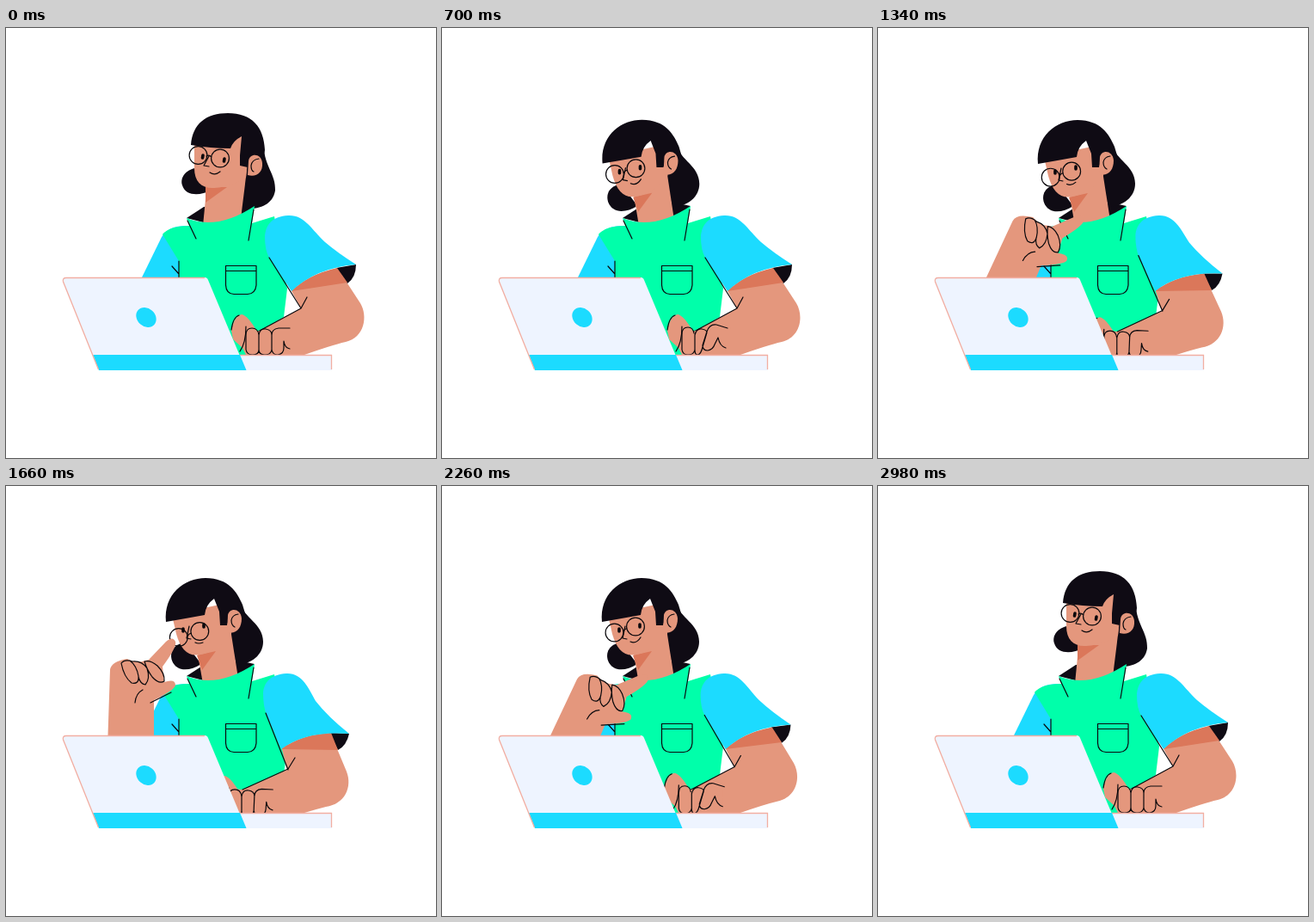
An HTML page for the animation above (3 s loop, 500x500 px).

```html
<!DOCTYPE html>
<html lang="en">
<head>
<meta charset="utf-8">
<title>Typing at a laptop</title>
<style>
  html, body { margin: 0; width: 100%; height: 100%; overflow: hidden; background: #fff; }
  svg { display: block; width: 100%; height: 100%; }
  .skin { fill: #e4977d; }
  .shade { fill: #db775a; }
  .hair { fill: #0f0b14; }
  .blue { fill: #1cdbff; }
  .green { fill: #00ffaa; }
  .pale { fill: #eef4ff; }
  .line { fill: none; stroke: #0a080c; stroke-width: 1.2; stroke-linecap: round; stroke-linejoin: round; }
  .edge { fill: none; stroke: #f2aea2; stroke-width: 1.3; }
  #eyes { stroke-width: 3.6; }
</style>
</head>
<body>
<svg viewBox="0 0 500 500">
  <clipPath id="aboveBase"><path d="M0 0 H500 V385 H0Z"/></clipPath>

  <path class="hair" d="M210 221 L230 208 L275 204 L289 207 L272 224 L245 230Z"/>
  <path class="hair" id="bun"/>
  <path class="hair" id="backHair"/>
  <path class="skin" id="neck"/>
  <path class="shade" id="neckShade"/>
  <path class="skin" id="face"/>
  <path class="hair" id="fringe"/>
  <path class="skin" id="ear"/>
  <path class="line" id="earLine"/>
  <path class="line" id="eyes"/>
  <path class="line" id="nose"/>
  <path class="line" id="mouth"/>
  <path class="line" id="glasses"/>

  <path class="blue" d="M157 292 L181 243 Q189 229 213 230 L202 292Z"/>
  <path class="green" d="M210 221 Q245 236 289 207 L286 227 L312 219 L327 303 L323 336 L290 356 L280 380 H201 V271 L182 240 Q190 230 213 230Z"/>
  <path class="line" d="M211 224 L221 245 M288 211 L282 247 M201 271 V290 M193 277 L201 286 M255.500 276.500 H291 V299 Q290 309 281 309.500 H265 Q256 309 255.500 299Z M255.500 282.500 H291"/>

  <path class="skin" id="arm"/>
  <path class="hair" id="cuff"/>
  <path class="shade" id="armShade"/>
  <path class="blue" id="sleeve"/>
  <path class="line" id="armLines"/>
  <g id="typing">
    <path class="skin" d="M262 352 Q265 335 274 333 Q281 334 292 353 L318 345 L330 350 V380 H279 L275 372 L264 362Z"/>
    <path class="line" d="M262 351 Q264 336 271 334 M279 347 Q279 366 272 376"/>
    <path class="line" id="fingers"/>
  </g>

  <g clip-path="url(#aboveBase)">
    <g id="raised">
      <path class="skin" d="M118 305 L121 214 Q122 204 141 201 Q151 207 162 203 L166 202 L186 181 Q194 174 197 181 Q199 187 182 210 L184 228 L188 227 Q197 225 197 232 Q195 238 172 249 V305Z"/>
      <path class="line" d="M134 206 Q138 201 147 204 M134 206 Q137 222 146 229 Q155 231 154 221 Q152 209 144 203 M147 204 Q158 203 164 212 Q168 224 162 231 Q156 230 154 222 M161 204 Q168 202 176 209 Q185 218 184 227 Q178 231 170 222 Q164 214 161 204 M150 252 Q151 241 159 237 M168 252 L192 240"/>
    </g>
  </g>

  <path class="pale" d="M270 380 H379 V398 H270Z"/>
  <path class="edge" d="M272 380.500 H378.500 V397"/>
  <path class="pale" d="M70 290 H231 Q234 290 235 293 L279 398 H108 L66 295 Q65 290 70 290Z"/>
  <path class="blue" d="M101 380 H272 L279.500 398 H108Z"/>
  <path class="edge" d="M107.500 397 L66.500 295 Q65.500 290.500 70 290.500 H231"/>
  <ellipse class="blue" cx="163" cy="336.500" rx="12.600" ry="10.400" transform="rotate(42 163 336.5)"/>
</svg>
<script>
const LOOP = 3000;
const $ = id => document.getElementById(id);
const R = 10.4;
const ring = (x, y) => `M${x - R} ${y} A${R} ${R} 0 1 1 ${x + R} ${y} A${R} ${R} 0 1 1 ${x - R} ${y}`;

// Each shape has two poses with the same command sequence.
const headPoses = {
  bun: ['M226 162 C209 163 202 174 205 183 C209 196 226 195 238 189Z',
        'M208 182 C194 184 190 194 193 203 C198 216 213 216 227 207Z'],
  backHair: ['M270 130 L300 138 C300 160 314 170 313 189 C310 207 292 212 272 210Z',
             'M245 135 L273 137 C276 153 299 160 299 181 C299 196 286 207 268 208Z'],
  neck: ['M234 178 L229 230 H272 L280 165Z', 'M222 190 L229 230 H271 L260 160Z'],
  neckShade: ['M232 185 L257 185 L232 203Z', 'M222 197 L244 192 L228 214Z'],
  face: ['M219 132 L219 163 C219 179 228 187 242 186 C258 185 270 180 279 174 L284 125Z',
         'M193 150 L198 172 C203 190 212 199 226 196 C240 193 252 186 262 172 L262 135Z'],
  fringe: ['M215 136 C217 111 233 99 258 99 C286 99 300 115 301 142 L299 152 L284 151 L281 162 L272 160 L272 148 L274 126 Q264 131 261 140 Q238 140 215 136Z',
           'M186 158 C183 126 207 107 232 107 C259 107 269 124 275 138 L278 148 L261 147 L257 162 L249 162 L248 146 L242 131 Q232 138 231 150 Q209 154 186 158Z'],
  ear: ['M282 155 C283 145 297 145 298 157 C299 168 291 174 281 171Z',
        'M258 150 C260 141 273 142 274 154 C274 165 268 173 257 170Z'],
  earLine: ['M294 152 Q286 153 285 160 Q285 166 288 167', 'M270 149 Q263 150 262 156 Q262 162 266 164'],
  eyes: ['M229 148 L228.5 151 M254 152 L253.5 155', 'M206 166 L206 169 M230 161 L230 164'],
  nose: ['M236 149 L230 160 L236 161', 'M213 163 L210 177 L215 178'],
  glasses: [ring(223.5, 148) + ' M233 149 Q236 147 239 150 ' + ring(249, 151.5),
            ring(200.5, 170.5) + ' M211 169 Q213 165 215 166 ' + ring(225, 163.5)]
};
const smile = ['M237 168 Q243 172 249 167', 'M219 181 Q226 184 231 176'];
const pout = 'M220 182 Q224 184 229 182';
const armPoses = {
  arm: ['M331 304 L385 279 L397 297 L412 320 C421 335 417 360 395 365 Q378 369 347 380 H280 L282 350 L293 353 L343 326Z',
        'M320 303 L377 287 L386 308 L396 332 C403 350 394 370 372 373 Q360 376 347 380 H262 L263 352 L275 353 L327 330Z'],
  cuff: ['M384 279 L407 275 Q407 290 397 297Z', 'M376 287 L399 288 Q396 302 386 307Z'],
  armShade: ['M332 306 Q350 287 385 279 L397 296Z', 'M320 306 Q342 289 378 287 L386 307Z'],
  sleeve: ['M301 243 C302 228 310 219 328 218 C347 217 355 234 371 249 Q385 261 407 275 Q360 279 332 306 L306 267 Q301 258 301 243Z',
           'M299 241 C300 228 308 219 326 218 C344 217 352 235 360 250 Q374 268 399 288 Q349 284 320 306 L303 266 Q299 256 299 241Z'],
  armLines: ['M306 267 L343 326 M350 313 L343 326 L293 353', 'M302 264 L328 330 M336 316 L328 329 L275 353']
};
const fingers = [
  'M294 357 Q293 349 286 349 Q279 349 279 357 V374 Q280 380 287 380 Q294 380 294 374 V357 Q295 349 302 350 Q309 351 309 357 L309 374 Q308 380 301 380 Q294 380 294 374 M330 349 L317 349 Q309 350 309 357 L309 374 Q310 380 316 380 Q323 379 323 372 L323 364 Q324 372 330 373',
  'M293 355 Q292 348 286 348 Q279 348 279 356 V374 Q280 380 286 380 Q293 380 294 374 V357 Q296 349 302 350 Q308 351 308 354 L303 371 Q301 380 297 380 Q294 380 294 374 M332 349 L319 345 Q311 344 308 353 L303 369 Q303 375 309 375 Q315 374 317 368 L321 360 Q323 370 330 372'];

function mix([a, b], t) {
  const to = b.match(/[\d.]+/g);
  let i = 0;
  return a.replace(/[\d.]+/g, n => +(+n + (to[i++] - n) * t).toFixed(2));
}

function ease(t, start, end) {
  const u = Math.min(1, Math.max(0, (t - start) / (end - start)));
  return u * u * (3 - 2 * u);
}

// Rises during the first span and falls during the second.
const pulse = (t, a, b, c, d) => ease(t, a, b) - ease(t, c, d);
const setPath = (id, poses, t) => $(id).setAttribute('d', mix(poses, t));

function draw(t) {
  const lean = pulse(t, 170, 750, 2430, 2985);
  const pull = pulse(t, 980, 1480, 1920, 2390);
  const slip = pulse(t, 1150, 1500, 1680, 1900);
  const low = 1 - pulse(t, 1000, 1600, 1900, 2730);
  const tap = (1 - Math.cos(t / LOOP * 4 * Math.PI)) / 2;

  for (const id in headPoses) setPath(id, headPoses[id], lean);
  setPath('mouth', [mix(smile, lean), pout], slip);
  $('glasses').setAttribute('transform', `translate(${0.3 * slip} ${5.5 * slip})`);

  for (const id in armPoses) setPath(id, armPoses[id], pull);
  setPath('fingers', fingers, Math.min(1, tap * 1.3));
  $('typing').setAttribute('transform', `translate(${-20 * pull} ${4 * pull})`);

  // The forearm swings down behind the screen around its elbow.
  $('raised').setAttribute('transform',
    `translate(${-20 * low ** 8} ${80 * low * low}) rotate(${58 * low} 145 300)`);
}

function frame(now) {
  draw(now % LOOP);
  requestAnimationFrame(frame);
}
draw(0);
requestAnimationFrame(frame);
</script>
</body>
</html>
```
